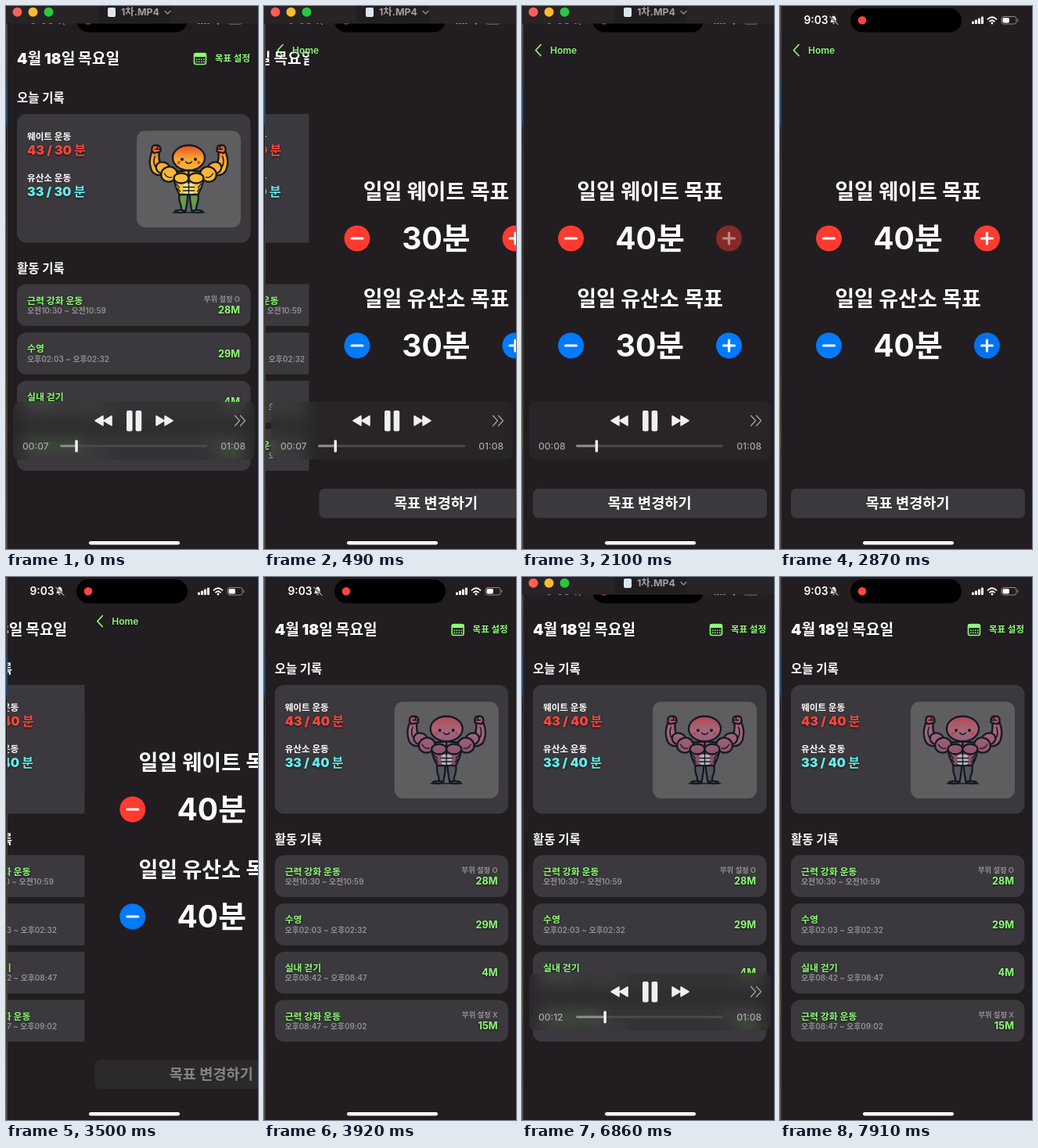
These frames come from a looping animation (322x694 px, 8.4 s). An HTML page with a canvas:

```html
<!DOCTYPE html>
<html lang="ko">
<meta charset="utf-8">
<title>운동 기록</title>
<style>
  html, body { margin: 0; width: 100%; height: 100%; overflow: hidden; background: #221d20 }
  canvas { display: block }
</style>
<canvas id="stage" width="322" height="694"></canvas>
<script>
const canvas = document.getElementById('stage'), c = canvas.getContext('2d');
const W = 322, H = 694, LOOP = 8400;
const BG = '#221d20', CARD = '#3b393d', GREEN = '#8cff74', GREY = '#939195', RED = '#ff3b30', BLUE = '#007aff';

const clamp = v => Math.max(0, Math.min(1, v));
const ramp = (t, from, to) => clamp((t - from) / (to - from));
const spring = ms => { const k = Math.max(0, ms) * .016; return 1 - (1 + k) * Math.exp(-k); };

// y is the visual middle of the line
function text(s, x, y, size, color, { weight = 700, align = 'left', shadow = 0 } = {}) {
  c.font = `${weight} ${size}px Inter, "Noto Sans CJK KR", sans-serif`;
  c.textAlign = align;
  c.fillStyle = color;
  if (shadow) { c.shadowColor = 'rgba(0,0,0,.7)'; c.shadowBlur = shadow; c.shadowOffsetY = 1; }
  c.fillText(s, x, y + size * .36);
  c.shadowColor = 'transparent';
}
function box(x, y, w, h, r, color) {
  c.fillStyle = color;
  c.beginPath(); c.roundRect(x, y, w, h, r); c.fill();
}
function disc(x, y, r, color) {
  c.fillStyle = color;
  c.beginPath(); c.arc(x, y, r, 0, 7); c.fill();
}
function stroke(d, color, width) {
  c.strokeStyle = color; c.lineWidth = width; c.lineCap = c.lineJoin = 'round';
  c.stroke(new Path2D(d));
}
function fill(d, color) { c.fillStyle = color; c.fill(new Path2D(d)); }
function group(x, y, alpha, draw) {
  c.save(); c.translate(x, y); c.globalAlpha *= alpha; draw(); c.restore();
}

function muscleMan(happy) {
  const ink = '#141a24';
  const [top, mid, low, abs, pants] = happy
    ? ['#ea4c2c', '#f9a72f', '#ffc541', '#ffdf8c', '#6b9a4b']
    : ['#b5484c', '#a5667c', '#86506a', '#b8b0b6', '#55535c'];
  const skin = c.createLinearGradient(0, 0, 0, 55);
  [top, mid, low].forEach((col, i) => skin.addColorStop([0, .32, 1][i], col));
  const blob = (x, y, rx, ry, turn = 0, color = skin) => {
    c.beginPath(); c.ellipse(x, y, rx, ry, turn, 0, 7);
    c.fillStyle = color; c.fill();
    c.strokeStyle = ink; c.lineWidth = 2.3; c.stroke();
  };
  const shape = (d, color) => { fill(d, color); stroke(d, ink, 2.3); };
  stroke('M-20 86H20', ink, 1.5);
  for (const side of [-1, 1]) {
    c.save(); c.scale(side, 1);
    shape('M1 61H12Q13 71 10 77L9 84H4L2 72Z', pants);
    blob(11, 84.5, 6.5, 1.6, 0, pants);
    shape('M38 9L47 8Q52 20 48 31Q45 39 35 38L31 29Q39 25 38 9Z', skin);
    blob(33, 29, 9, 7.5, -.3);
    shape('M36 8Q35 1 40 0Q47 -1 47 4Q48 8 44 10Z', skin);
    stroke('M37 5H43M40 1V4M43 14Q46 20 43 27', ink, 1.6);
    shape('M0 32L20 34Q20 48 12 63H0Z', skin);
    blob(25, 37, 10.5, 9.5, .3);
    blob(9.5, 42, 9.5, 6.5);
    stroke('M12 54L16 49M11 59L14 55M22 41Q28 42 31 36', ink, 1.3);
    c.restore();
  }
  box(-7, 49, 14, 13, 4, abs);
  stroke('M0 48V62M-7 53.5H7M-7 58H7', ink, 1.3);
  blob(0, 16, 20.5, 16);
  for (const x of [-8.5, 8.5]) { disc(x, 18, 2, ink); disc(x * 1.5, 22, 2.2, top); }
  stroke('M-4 21Q0 25.5 4 21', ink, 1.5);
}

function home(weight, cardio) {
  text('4월 18일 목요일', 14, 67, 19.2, '#fff', { weight: 900 });
  stroke('M243 60.5H253Q255.5 60.5 255.5 63V72Q255.5 74.5 253 74.5H243Q240.5 74.5 240.5 72V63Q240.5 60.5 243 60.5Z', GREEN, 1.6);
  box(240, 60, 16, 5, 2, GREEN);
  for (let i = 0; i < 8; i++) box(243 + i % 4 * 3, 67.5 + (i >> 2) * 3, 1.6, 1.6, 0, GREEN);
  text('목표 설정', 312, 67, 11.5, GREEN, { align: 'right', shadow: 2 });
  text('오늘 기록', 14, 117, 15.5, '#fff');
  box(14, 138, 298.5, 164.5, 12, CARD);
  [['웨이트 운동', 43, weight, '#ff453a'], ['유산소 운동', 33, cardio, '#66eaea']].forEach(([name, done, goal, color], i) => {
    text(name, 27, 166.5 + i * 53, 11.6, '#fff');
    text(`${done} / ${goal} 분`, 27, 184 + i * 53, 16, color, { weight: 900, shadow: 3 });
  });
  box(167, 159.5, 133, 123.5, 11, '#5e5e60');
  group(233.5, 178, 1, () => muscleMan(cardio <= 33));
  text('활동 기록', 14, 335, 15.5, '#fff');
  [
    ['근력 강화 운동', '오전10:30 ~ 오전10:59', 28, 'O'],
    ['수영', '오후02:03 ~ 오후02:32', 29],
    ['실내 걷기', '오후08:42 ~ 오후08:47', 4],
    ['근력 강화 운동', '오후08:47 ~ 오후09:02', 15, 'X']
  ].forEach(([name, span, minutes, part], i) => {
    const y = 355.5 + i * 61.7;
    box(14, y, 298.5, 53.5, 12, CARD);
    text(name, 27, y + 21, 11.9, GREEN, { shadow: 3 });
    text(span, 27, y + 34, 9.9, GREY, { weight: 600 });
    if (part) text('부위 설정 ' + part, 299, y + 19.5, 9.3, GREY, { weight: 600, align: 'right' });
    text(minutes + 'M', 299, y + (part ? 33 : 27), 12.7, GREEN, { align: 'right', shadow: 3 });
  });
}

function roundButton(x, y, color, plus, alpha = 1) {
  group(x, y, alpha, () => {
    disc(0, 0, 16.5, color);
    stroke('M-7 0H7' + (plus ? 'M0 -7V7' : ''), '#fff', 3.2);
  });
}
function settings(goals, pressed, buttonAlpha) {
  [['일일 웨이트 목표', RED], ['일일 유산소 목표', BLUE]].forEach(([name, color], i) => {
    const y = 297 + i * 137;
    text(name, 163.5, y - 60, 27, '#fff', { align: 'center' });
    text(goals[i] + '분', 163.5, y, 39, '#fff', { align: 'center' });
    roundButton(62.5, y, color, false);
    roundButton(264.5, y, color, true, pressed[i]);
  });
  group(0, 0, buttonAlpha, () => {
    box(14, 617, 299, 37.5, 7, CARD);
    text('목표 변경하기', 163, 635.5, 18.6, '#fff', { align: 'center' });
  });
}
function backLink() {
  stroke('M24 49.5L17.5 56.5L24 63.5', GREEN, 1.7);
  text('Home', 36, 56.5, 12, GREEN, { weight: 600, shadow: 2 });
}

function statusBar() {
  text('9:03', 30.5, 18, 13.8, '#fff', { weight: 600 });
  group(68.5, 18, 1, () => {
    fill('M-4.5 3Q-3 2 -3 -1Q-3 -5 0 -5.5Q3 -5 3 -1Q3 2 4.5 3ZM-1.5 4H1.5Q0 6 -1.5 4Z', '#fff');
    stroke('M-5 -5L5.5 5.5', BG, 2.4);
    stroke('M-5 -5L5.5 5.5', '#fff', 1);
  });
  box(90, 3, 142, 30.5, 15.3, '#000');
  disc(105, 18.3, 5.3, '#ff453d');
  for (let i = 0; i < 4; i++) box(245 + i * 4, 19.5 - i * 2, 3, 3.5 + i * 2, 1, '#fff');
  stroke('M265.5 16.8Q271 11.8 276.5 16.8M268 19.6Q271 17 274 19.6', '#fff', 1.8);
  disc(271, 22, 1.4, '#fff');
  stroke('M286 13.5H299Q302 13.5 302 16V20.5Q302 23 299 23H286Q283 23 283 20.5V16Q283 13.5 286 13.5ZM304 17V19.5', '#8d8c8e', 1);
  box(284.5, 15, 8.5, 6.6, 1.8, '#fff');
}

function player(alpha, seconds) {
  if (!alpha) return;
  c.save();
  c.globalAlpha = alpha;
  box(0, 0, W, 22.5, 0, '#272326');
  box(118, 0, 93, 21, 3, '#211d20');
  ['#ff5f57', '#febc2e', '#28c840'].forEach((color, i) => disc(14.5 + i * 20, 7.7, 6, color));
  box(130, 2, 10, 12, 2, '#dce6ee');
  text('1차.MP4', 147, 8, 12.4, '#a3a1a3');
  stroke('M203 6.5L206.5 10L210 6.5', '#8d8b8d', 1.5);

  c.save();
  c.beginPath(); c.roundRect(9, 506, 309, 73.5, 8); c.clip();
  c.filter = 'blur(9px)';
  c.drawImage(canvas, 0, 0);
  c.filter = 'none';
  box(9, 506, 309, 74, 0, 'rgba(47,45,47,.5)');
  c.restore();

  const white = '#f1f0f1', soft = '#a9a7a9';
  const arrows = 'M1 -6L11 0L1 6ZM-10 -6L0 0L-10 6Z';
  for (const side of [-1, 1]) {
    c.save(); c.translate(163.5 + side * 38.5, 530); c.scale(side, 1);
    fill(arrows, white); stroke(arrows, white, 1.5);
    c.restore();
    box(159.8 + side * 5.8, 517, 7.6, 26.5, 2, white);
  }
  stroke('M292.5 523.5L298.5 530L292.5 536.5M299.5 523.5L305.5 530L299.5 536.5', soft, 1.2);
  const knob = 70.5 + 188 * seconds / 68;
  box(69, 560.7, 188, 3, 1.5, '#4b494b');
  box(69, 560.7, knob - 69, 3, 1.5, '#8d8b8d');
  box(knob - 1.7, 554.5, 3.5, 16, 1.7, white);
  text('00:' + String(Math.floor(seconds)).padStart(2, '0'), 21, 562.5, 12, soft, { weight: 500 });
  text('01:08', 306, 562.5, 12, soft, { weight: 500, align: 'right' });
  c.restore();
}

function leftEdge() {
  const g = c.createLinearGradient(0, 0, 0, H);
  [[0, '#4a484a'], [.13, '#3c3b40'], [.16, '#174a7c'], [.21, '#174a7c'], [.23, '#141316'], [.36, '#232325'],
   [.67, '#3a3a20'], [.8, '#4a4a24'], [.84, '#39383a'], [1, '#4a484a']].forEach(s => g.addColorStop(...s));
  box(0, 0, 1, H, 0, g);
  box(1, 0, 1, H, 0, '#454246');
}

// opacity of a tapped button: held down, then eased back
const tapped = (t, at) => t < at ? 1 : .45 + .55 * ramp(t, at + 140, at + 340);

function draw(t) {
  const weight = t < 2030 ? 30 : 40, cardio = t < 2630 ? 30 : 40;
  const push = spring(t - 293), pop = spring(t - 3431);
  const pushing = t < 3431, shown = pushing ? push : 1 - pop;
  const offset = W * (1 - shown);

  box(0, 0, W, H, 0, BG);
  group(-.3 * W * shown, 0, 1, () => home(weight, cardio));
  if (shown > .002) {
    box(offset + 1, 0, W, H, 0, BG);
    group(offset, 0, 1, () => settings([weight, cardio], [tapped(t, 1990), tapped(t, 2560)], 1 - .58 * ramp(t, 3300, 3400)));
    group(pushing ? 0 : offset, 0, pushing ? clamp(push * 1.2) : 1, backLink);
  }
  statusBar();
  box(106, 684, 116, 4.4, 2.2, '#fff');
  leftEdge();

  const bar = t < 4000 ? 1 - ramp(t, 2520, 2870) : ramp(t, 5310, 5640) - ramp(t, 7560, 7910);
  player(clamp(bar), 7.05 + Math.min(t, 6370) * .00091);
}

const start = performance.now();
(function tick() {
  draw((performance.now() - start) % LOOP);
  requestAnimationFrame(tick);
})();
</script>
</html>
```
